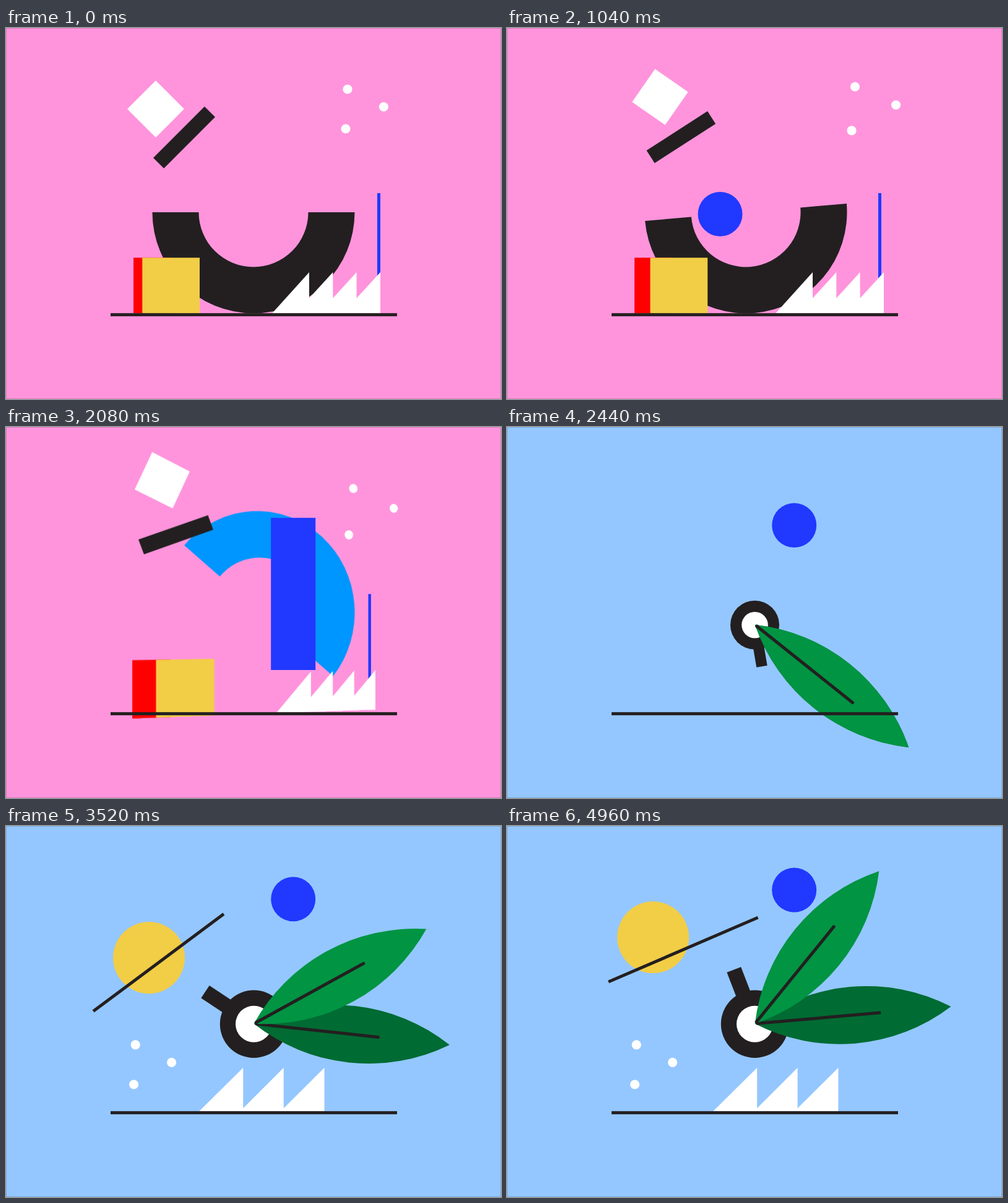
These frames come from a looping animation (800x600 px, 5000 ms). An HTML page:

```html
<!DOCTYPE html>
<html>
<head>
<meta charset="utf-8">
<style>
html, body { margin: 0; width: 100%; height: 100%; overflow: hidden; }
#stage { position: relative; width: 800px; height: 600px; overflow: hidden; }
svg { position: absolute; left: 0; top: 0; width: 800px; height: 600px; overflow: visible; }
#frame { fill: none; stroke: #000; stroke-opacity: .16; }
.ink { fill: #231f20; }
.white { fill: #fff; }
.blue { fill: #2138ff; }
.yellow { fill: #f2cd46; }
.stroke { stroke: #231f20; stroke-width: 5; fill: none; }
.round { stroke-linecap: round; }
</style>
</head>
<body>
<div id="stage">
  <svg id="day" viewBox="0 0 800 600">
    <path id="bowl" d="M-163.5 0A163.5 163.5 0 0 0 163.5 0H88.5A88.5 88.5 0 0 1 -88.5 0Z"/>
    <rect id="diamond" class="white" x="-32.5" y="-32.5" width="65" height="65"/>
    <rect id="bar" class="ink" x="-58.6" y="-12.1" width="117.2" height="24.2"/>
    <rect x="206" y="371.5" width="60" height="90" fill="#f00"/>
    <rect id="box" class="yellow" y="371.5" width="92.7" height="90"/>
    <rect class="blue" x="600" y="267" width="5" height="194"/>
    <path id="saw" class="white" d="M430 461.5L490 395V437L528.3 395V437L566.6 395V437L605 395V461.5Z"/>
    <g id="dots" class="white"></g>
  </svg>
  <svg id="sky" viewBox="0 0 800 600">
    <circle id="sun" class="yellow" r="58"/>
    <path id="stick" class="stroke" d="M-131.5 0H131.5"/>
    <path id="teeth" class="white" d="M304.5 0L375.7 -70.5V-5L441.2 -70.5V-5L507 -70.5V0Z"/>
    <g id="specks" class="white"></g>
    <g id="head">
      <rect id="neck" class="ink" x="30" y="-12.2" width="64.2" height="24.4"/>
      <circle class="ink" r="54.7"/>
      <circle class="white" r="29.5"/>
    </g>
    <g id="leafB"></g>
    <g id="leafA"></g>
  </svg>
  <svg viewBox="0 0 800 600">
    <rect id="ball" class="blue" width="72"/>
    <rect class="ink" x="169" y="461.2" width="463" height="5"/>
    <rect id="frame" x=".5" y=".5" width="799" height="599"/>
  </svg>
</div>
<script>
const LOOP = 5000, STEP = 40, CUT = 2160;
const $ = id => document.getElementById(id);
const clamp = v => Math.min(1, Math.max(0, v));
const span = (t, a, b) => clamp((t - a) / (b - a));
const mix = (a, b, p) => a + (b - a) * p;
const smooth = p => p * p * (3 - 2 * p);
const outCubic = p => 1 - (1 - p) ** 3;
const set = (id, attrs) => {
  for (const k in attrs) $(id).setAttribute(k, attrs[k]);
};
const place = (id, x, y, turn = 0, scale = 1) =>
  set(id, { transform: `translate(${x} ${y}) rotate(${turn}) scale(${scale})` });

// smooth drift through three values, at 3000, 4040 and 4960 ms
function drift(t, a, b, c) {
  const ab = (b - a) / 1040, bc = (c - b) / 920;
  return a + ab * (t - 3000) + (bc - ab) / 1960 * (t - 3000) * (t - 4040);
}

// start x, y and travel per 1040 ms
const dots = [[552, 99, 10.5, -4], [610.4, 127.5, 18.2, -3], [549, 163, 8, 2.8]];
const specks = [[209.2, 353.8], [267.6, 382.4], [206.6, 418]];
const circle = '<circle r="7.6"/>';
$('dots').innerHTML = $('specks').innerHTML = circle.repeat(3);

const leaf = color =>
  `<path fill="${color}" d="M0 0A298 298 0 0 1 318 0A298 298 0 0 1 0 0Z"/>` +
  '<path class="stroke round" d="M4 0H202"/>';
$('leafA').innerHTML = leaf('#009443');
$('leafB').innerHTML = leaf('#006b33');

function drawDay(t) {
  const k = t / 1040;
  place('diamond', 242 + 5.4 * k, 131 - 19.4 * k, 45 - 10.2 * k);
  place('bar', 288 - 6.7 * k, 177 - .5 * k, -45 + 12.2 * k);
  set('box', { x: 220.3 + 11.2 * k });
  place('saw', 4 * k, 0);
  dots.forEach(([x, y, dx, dy], i) => {
    const c = $('dots').children[i];
    c.setAttribute('cx', x + dx * k);
    c.setAttribute('cy', y + dy * k);
  });

  const flip = Math.max(0, (t - 1960) / 120) ** 2;
  const x = bowlX(t);
  place('bowl', x, 298, (x - 400) / 163.5 * 180 / Math.PI - 144 * flip);
  set('bowl', { fill: t < 2040 ? '#231f20' : '#0096ff' });
  $('day').style.transform = flip
    ? `perspective(1250px) translateY(${2 * flip}px) scale(${1 + .005 * flip}) rotateY(${15.7 * flip}deg)`
    : 'none';
}

function bowlX(t) {
  return t < 1040
    ? mix(400, 386, smooth(span(t, 520, 1040)))
    : mix(386, 412, smooth(span(t, 1040, 2000)));
}

// returns x, top, bottom; a tall span is a square-ended smear
function ballSpan(t) {
  if (t < 480) return [0, 0, 0];
  if (t < 520) return [452, 2, 250];
  if (t < 560) return [452, 170, 350];
  if (t < 2040) {
    const p = span(t, 560, 1040), q = smooth(span(t, 1040, 2000));
    const turn = (t < 1040 ? mix(80, -86, 1 - (1 - p) ** 2) : mix(-86, 90, q)) * Math.PI / 180;
    const r = 52.5 - 10.9 * (t < 1040 ? p ** 3 : (1 - q) ** 3);
    const y = 298 + r * Math.cos(turn);
    return [bowlX(t) + r * Math.sin(turn), y - 36, y + 36];
  }
  if (t < 2080) return [464.5, 262, 393];
  const lift = 50 * (1 - smooth(span(t, 2080, 2800) ** 1.2));
  const y = 123.5 - .0102 * (t - 3000) + lift;
  const end = t < 2120 ? 393 : t < 2160 ? 300 : y + 36;
  return [464.2, y - 36, end];
}

function drawBall(t) {
  const [x, top, end] = ballSpan(t), h = end - top;
  set('ball', { x: x - 36, y: top, height: h, rx: h > 73 ? 0 : 36 });
}

function drawSky(t) {
  const grow = outCubic(span(t, 2240, 2815)), left = 1 - grow;
  const a = drift(t, -19.3, -37.5, -50.9) + 168.6 * left;
  const b = Math.max(a, drift(t, 8.6, 2.9, -5));
  place('head', 400.5, 320.2, 0, grow);
  place('neck', 0, 0, drift(t, 195.3, 228.9, 249) - 332 * left);
  place('leafA', 400.7, 319.7, a);
  place('leafB', 400.7, 319.7, b);
  for (const id of ['leafA', 'leafB', 'head']) {
    $(id).style.display = t < 2240 ? 'none' : '';
  }

  const enter = outCubic(span(t, 2440, 2800)), away = 1 - enter;
  const k = (t - 3000) / 1000;
  place('sun', 229.2 + 3.5 * k, 225 - 22.9 * k, 0, enter);
  place('stick', drift(t, 233.8, 259.8, 284.8) - 150 * away,
    drift(t, 230.5, 212.5, 200) + 133 * away, drift(t, -41.5, -31.9, -23.3));
  $('stick').style.display = enter ? '' : 'none';
  set('teeth', { transform: `translate(${14.5 * k} 461.5) scale(1 ${enter})` });
  specks.forEach(([x, y], i) => {
    const p = outCubic(span(t, 2480 + 40 * i, 2720 + 40 * i));
    $('specks').children[i].setAttribute('transform', `translate(${x} ${y}) scale(${p})`);
  });
}

function draw(t) {
  const day = t < CUT;
  $('stage').style.background = day ? '#ff94dc' : '#94c7ff';
  $('day').style.display = day ? '' : 'none';
  $('sky').style.display = day ? 'none' : '';
  if (day) drawDay(t); else drawSky(t);
  drawBall(t);
}

const begin = performance.now();
function tick() {
  const t = (performance.now() - begin) % LOOP;
  draw(Math.floor(t / STEP) * STEP);
  requestAnimationFrame(tick);
}
tick();
</script>
</body>
</html>
```
